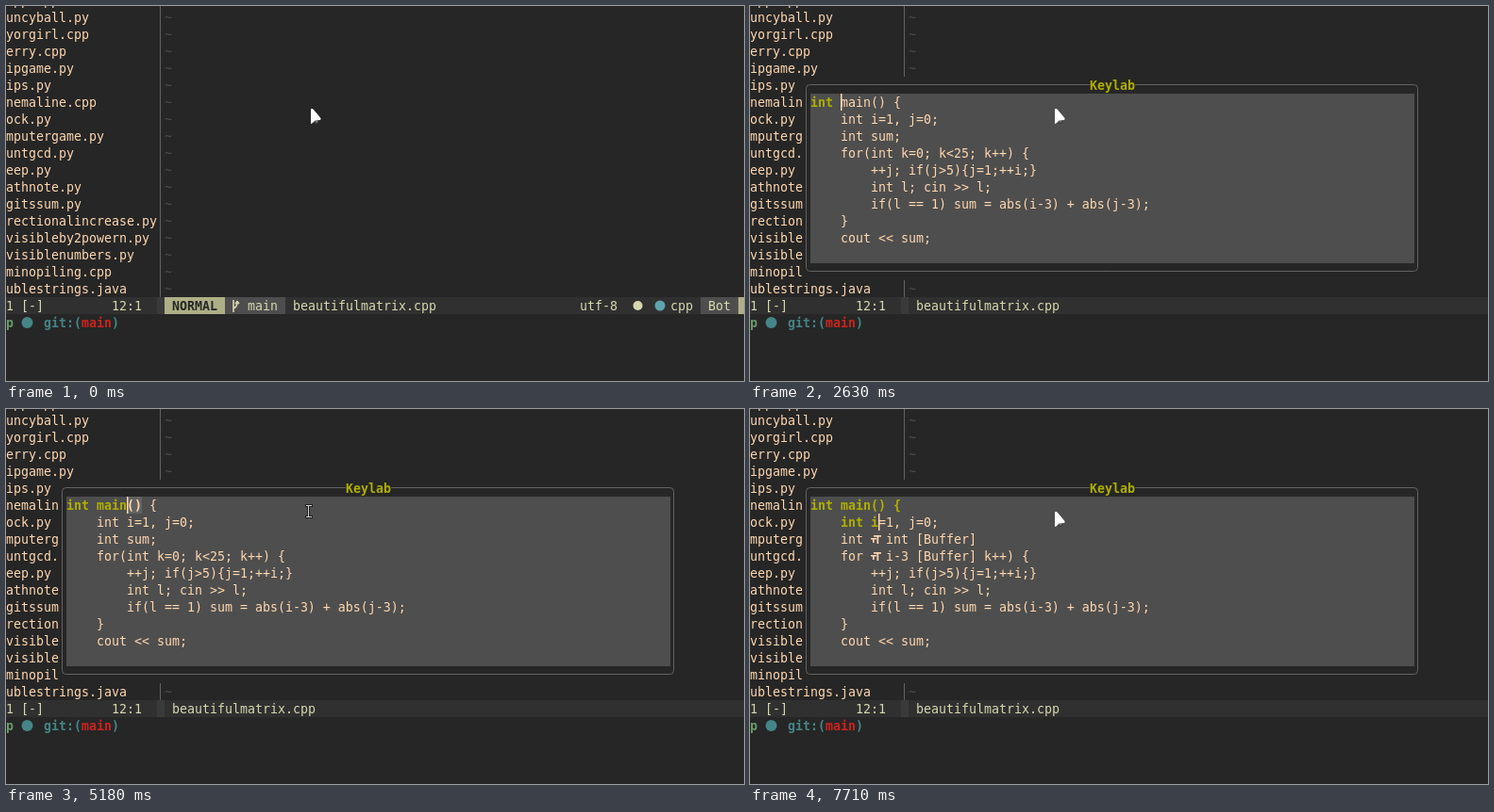
An HTML page with a canvas that plays this animation: 782 by 398 pixels, repeating every 8 s.

```html
<!DOCTYPE html>
<html lang="en">
<head>
<meta charset="utf-8">
<title>Typing practice in the editor</title>
<style>
html, body { margin: 0; width: 100%; height: 100%; overflow: hidden; background: #262626; }
canvas { display: block; }
</style>
</head>
<body>
<canvas id="stage" width="782" height="398"></canvas>
<script>
const ctx = document.getElementById('stage').getContext('2d');
const LOOP = 8000, CW = 8, LH = 18, LEFT = 64, TOP = 93;
const FONT = '13.29px "DejaVu Sans Mono", "Noto Sans Mono", monospace';
const C = {
  bg: '#262626', bar: '#303030', edge: '#3a3a3a', panel: '#4e4e4e',
  split: '#626262', fg: '#ffd7af', status: '#d7d7af', mode: '#afaf87', done: '#afaf00',
  teal: '#458588', aqua: '#689d6a', red: '#cc241d'
};

const files = ['tpp.cpp', 'uncyball.py', 'yorgirl.cpp', 'erry.cpp', 'ipgame.py', 'ips.py',
  'nemaline.cpp', 'ock.py', 'mputergame.py', 'untgcd.py', 'eep.py', 'athnote.py',
  'gitssum.py', 'rectionalincrease.py', 'visibleby2powern.py', 'visiblenumbers.py',
  'minopiling.cpp', 'ublestrings.java'];

const code = ['int main() {', '    int i=1, j=0;', '    int sum;',
  '    for(int k=0; k<25; k++) {', '        ++j; if(j>5){j=1;++i;}',
  '        int l; cin >> l;', '        if(l == 1) sum = abs(i-3) + abs(j-3);',
  '    }', '    cout << sum;'];

// time, cursor row, cursor column, completion words, completion column
const steps = [
  [1890, 0, 0], [2310, 0, 1], [2390, 0, 1, 'int i-3', 0], [2470, 0, 2, 'int', 0],
  [2550, 0, 3, 'int', 0], [2630, 0, 4], [2710, 0, 5], [2790, 0, 6, 'main', 4],
  [2870, 0, 7, 'main', 4], [2950, 0, 8, 'main', 4], [3600, 0, 10], [3680, 0, 11],
  [4350, 0, 10], [4600, 0, 9], [5180, 0, 8], [5340, 0, 9], [5420, 0, 10],
  [6080, 0, 11], [6320, 0, 12], [6480, 1, 4], [7230, 1, 5], [7310, 1, 6, 'int', 4],
  [7470, 1, 7, 'int', 4], [7550, 1, 8], [7630, 1, 9], [7710, 1, 9, 'int i-3', 8]
];

function rect(x, y, w, h, color) {
  ctx.fillStyle = color;
  ctx.fillRect(x, y, w, h);
}

function text(str, x, top, color, bold) {
  ctx.font = (bold ? 'bold ' : '') + FONT;
  ctx.fillStyle = color;
  ctx.fillText(str, x, top + 14);
}

function dot(x, y, r, color) {
  ctx.fillStyle = color;
  ctx.beginPath();
  ctx.arc(x, y, r, 0, Math.PI * 2);
  ctx.fill();
}

function drawEditor() {
  rect(0, 0, 782, 398, C.bg);
  files.forEach((name, i) => {
    const y = -15 + i * LH;
    text(name, 0, y, C.fg);
    text('~', 168, y, C.panel);
  });
  rect(163, 0, 1, 309, C.split);

  rect(0, 309, 782, LH, C.bar);
  rect(160, 309, 8, LH, C.edge);
  text('1 [-]', 0, 309, C.status);
  text('12:1', 112, 309, C.status);

  text('p', 0, 327, C.aqua, true);
  dot(22.5, 336, 6, C.teal);
  text('git:(', 40, 327, C.teal, true);
  text('main', 80, 327, C.red, true);
  text(')', 112, 327, C.teal, true);
}

function drawBranch(x, y) {
  ctx.strokeStyle = C.status;
  ctx.lineWidth = 1.6;
  ctx.beginPath();
  ctx.moveTo(x + 2, y + 3);
  ctx.lineTo(x + 2, y + 16);
  ctx.moveTo(x + 2, y + 12);
  ctx.quadraticCurveTo(x + 6, y + 10.5, x + 6, y + 5);
  ctx.moveTo(x + 4, y + 7);
  ctx.lineTo(x + 6, y + 4.5);
  ctx.lineTo(x + 8, y + 7);
  ctx.stroke();
}

function drawActiveStatus() {
  rect(168, 309, 64, LH, C.mode);
  text('NORMAL', 176, 309, C.bg, true);
  rect(232, 309, 64, LH, C.panel);
  drawBranch(239, 309);
  text('main', 256, 309, C.status);
  text('beautifulmatrix.cpp', 304, 309, C.status);
  text('utf-8', 608, 309, C.status);
  dot(669.5, 318, 5, C.status);
  dot(693, 318, 5.5, '#5fa5ad');
  text('cpp', 704, 309, C.status);
  rect(736, 309, 40, LH, C.panel);
  text('Bot', 744, 309, C.status);
  rect(776, 309, 6, LH, C.mode);
}

function drawPopup() {
  text('beautifulmatrix.cpp', 176, 309, C.status);
  rect(56, 75, 656, 216, C.bg);
  ctx.strokeStyle = C.split;
  ctx.lineWidth = 1;
  ctx.beginPath();
  ctx.roundRect(59.5, 83.5, 648, 198, 4);
  ctx.stroke();
  rect(360, 75, 48, LH, C.bg);
  text('Keylab', 360, 75, C.done, true);
  rect(LEFT, TOP, 640, 180, C.panel);
}

function drawCode(row, col) {
  code.forEach((line, i) => {
    const n = i < row ? line.length : i === row ? col : 0;
    const y = TOP + i * LH;
    text(line.slice(0, n), LEFT, y, C.done, true);
    text(line.slice(n), LEFT + n * CW, y, C.fg);
  });
  // matching parentheses next to the cursor
  if (row === 0 && col >= 8 && col <= 10) {
    const x = LEFT + 8 * CW, n = col - 8;
    rect(x, TOP, 2 * CW, LH, C.split);
    text('()'.slice(0, n), x, TOP, C.done, true);
    text('()'.slice(n), x + n * CW, TOP, C.fg, true);
  }
}

function drawMenu(words, row, col) {
  const x = LEFT + col * CW;
  words.split(' ').forEach((word, i) => {
    const label = word + ' [Buffer]', y = TOP + (row + 1 + i) * LH;
    rect(x - 8, y, label.length * CW + 32, LH, C.panel);
    rect(x, y + 8, 6, 1.5, C.fg);
    rect(x + 2, y + 8, 1.6, 5, C.fg);
    rect(x + 3, y + 5, 8, 1.7, C.fg);
    rect(x + 6.5, y + 5, 1.7, 9, C.fg);
    text(label, x + 16, y, C.fg);
  });
}

function drawArrow() {
  dot(329, 122.5, 2.5, '#3a3a3a');
  dot(329, 122.5, 1.3, '#777');
  ctx.beginPath();
  ctx.moveTo(323.5, 109.5);
  ctx.lineTo(325, 109.5);
  ctx.lineTo(333, 119);
  ctx.lineTo(333, 120.5);
  ctx.lineTo(327.5, 121);
  ctx.lineTo(324, 124.5);
  ctx.lineTo(323.5, 124.5);
  ctx.closePath();
  ctx.lineJoin = 'round';
  ctx.strokeStyle = ctx.fillStyle = '#fff';
  ctx.lineWidth = 1;
  ctx.fill();
  ctx.stroke();
}

function drawBeam() {
  const parts = [[318, 102, 6, 1], [320, 102, 1, 13], [318, 114, 6, 1]];
  parts.forEach(([x, y, w, h]) => rect(x - 1, y - 1, w + 2, h + 2, '#222'));
  parts.forEach(([x, y, w, h]) => rect(x, y, w, h, '#d0d0d0'));
}

function draw(t) {
  drawEditor();
  if (t < 410) {
    drawActiveStatus();
  } else {
    drawPopup();
    const step = steps.filter(s => s[0] <= t).pop();
    const [, row, col, words, at] = step || [0, 0, 0];
    drawCode(row, col);
    if (words) drawMenu(words, row, at);
    const x = LEFT + col * CW, y = TOP + row * LH;
    rect(x, y, step ? 1.5 : CW, LH, C.fg);
    if (!step) text('i', x, y, C.panel);
  }
  const beam = (t >= 3360 && t < 5580) || (t >= 6160 && t < 6320);
  if (beam) drawBeam(); else drawArrow();
}

const start = performance.now();
function tick() {
  draw((performance.now() - start) % LOOP);
  requestAnimationFrame(tick);
}
tick();
</script>
</body>
</html>
```
